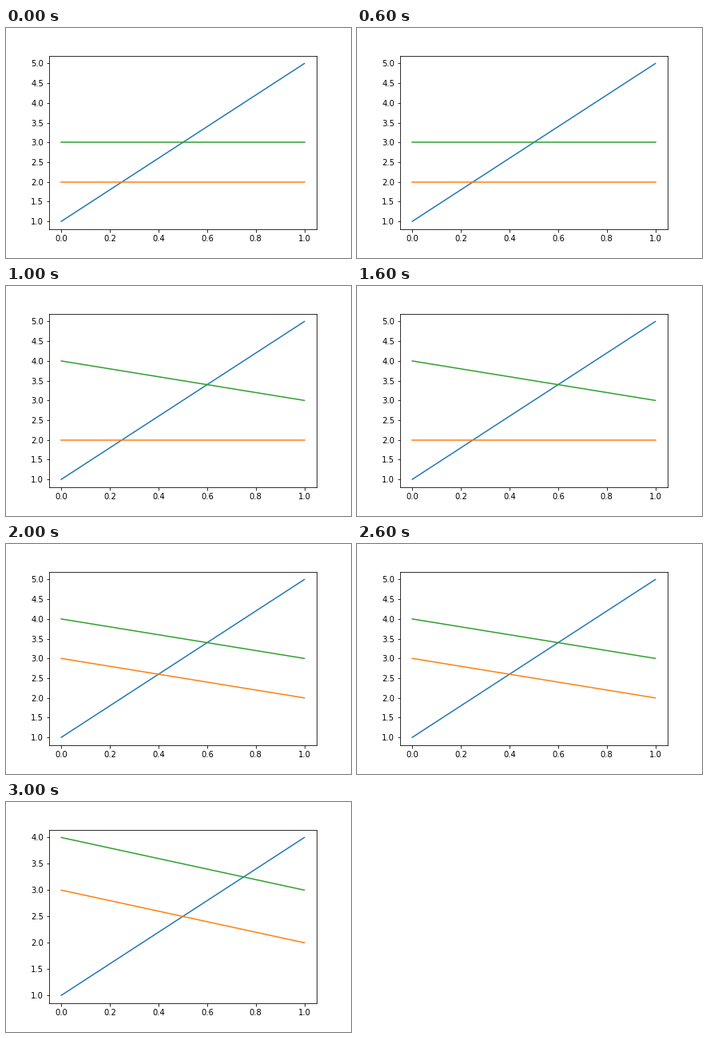
Animation, 432 px wide and 288 px high, one loop 4000 ms. Source, as a matplotlib script:

```python
import matplotlib.pyplot as plt
from matplotlib.animation import FuncAnimation
from matplotlib.ticker import MultipleLocator

plt.rcParams.update({"font.family": "DejaVu Sans", "font.size": 10})

LINE_COUNT = 3


def heights(index, step):
    """Start and end of a line; the last line shifts first, the first one last."""
    shift = int(step >= LINE_COUNT - index)
    base = index + 1
    if index == 0:
        return base, LINE_COUNT + 2 - shift
    return base + shift, base


fig, ax = plt.subplots(figsize=(6, 4), dpi=72, facecolor="white")
fig.subplots_adjust(left=0.125, right=0.9, bottom=0.125, top=0.88)
ax.xaxis.set_major_locator(MultipleLocator(0.2))
ax.yaxis.set_major_locator(MultipleLocator(0.5))
lines = [ax.plot((0, 1), heights(i, 0))[0] for i in range(LINE_COUNT)]


def update(step):
    for index, line in enumerate(lines):
        line.set_ydata(heights(index, step))
    ax.relim()
    ax.autoscale_view()
    return lines


anim = FuncAnimation(fig, update, frames=LINE_COUNT + 1, interval=1000,
                     repeat=True, repeat_delay=0, blit=False)
plt.show()
```
